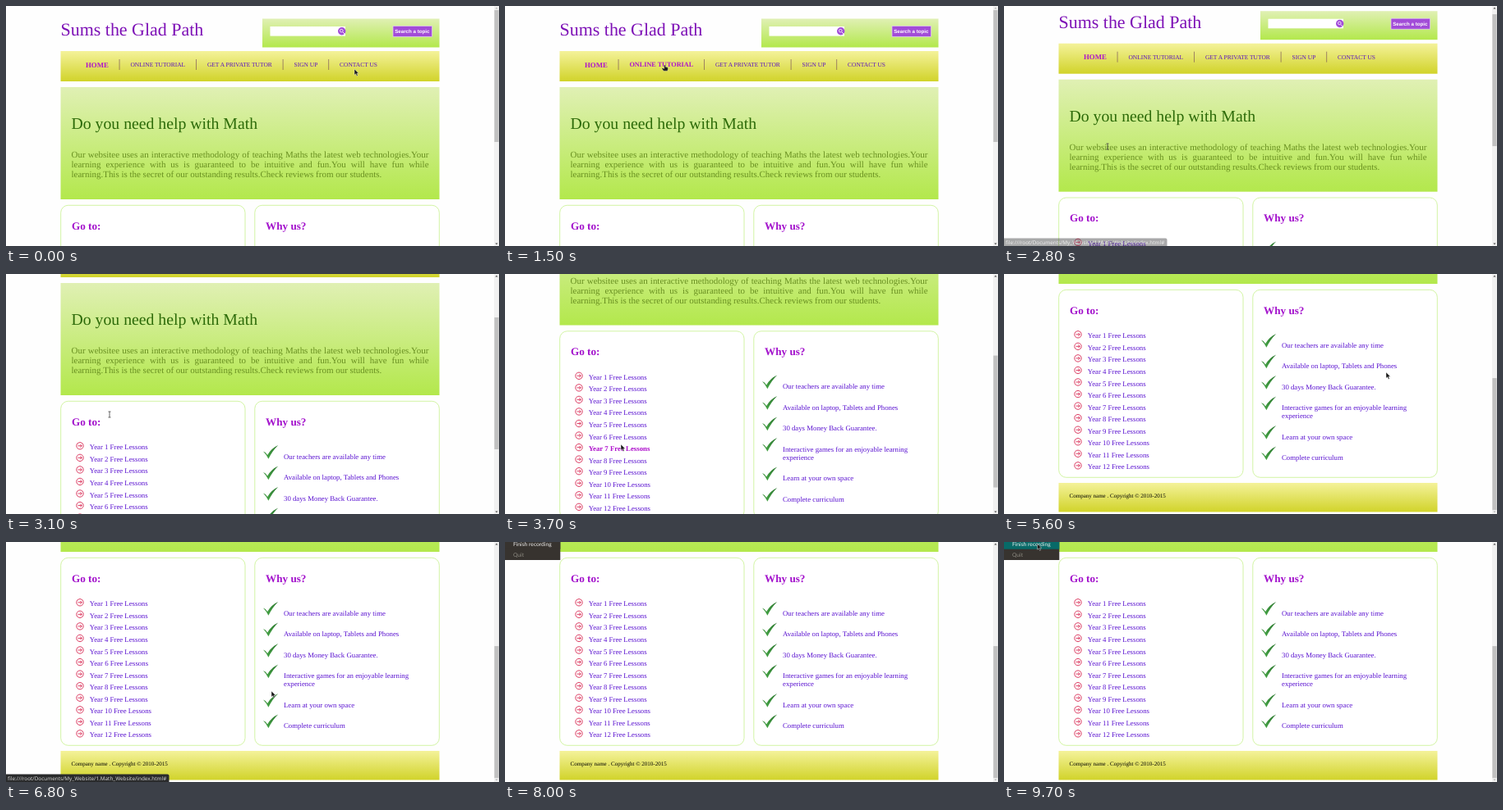
Animation, 600 px wide and 293 px high, one loop 9.9 s. Source, as an HTML page:

```html
<!DOCTYPE html>
<html lang="en">
<head>
<meta charset="utf-8">
<title>Maths lessons site</title>
<style>
  html, body { margin: 0; width: 100%; height: 100%; overflow: hidden; background: #fefefe; }
  svg { display: block; width: 100vw; height: 100vh; text-rendering: geometricPrecision;
        font-family: "Liberation Serif", "Times New Roman", serif; }
  p { margin: 0; font-size: 10.98px; line-height: 12.2px; text-align: justify; color: #688f20; }
  .link { fill: #5a12d0; font-size: 8.78px; }
  .heading { fill: #a312cc; font-size: 13.18px; font-weight: bold; }
  .panel { fill: #fff; stroke: #cdf39a; stroke-width: .9; }
  .bullet { fill: none; stroke: #dc3c62; stroke-width: 1; }
</style>
</head>
<body>
<svg viewBox="0 0 600 293">
  <defs>
    <linearGradient id="lime" x2="0" y2="1"><stop stop-color="#e0f0b4"/><stop offset="1" stop-color="#b3e84c"/></linearGradient>
    <linearGradient id="gold" x2="0" y2="1"><stop stop-color="#f4f29a"/><stop offset="1" stop-color="#d1d32a"/></linearGradient>
    <linearGradient id="leaf" x2="0" y2="1"><stop stop-color="#2f7a32"/><stop offset="1" stop-color="#45a545"/></linearGradient>
  </defs>

  <g id="page">
    <text x="66.5" y="36" font-size="21.96" fill="#7d10b6">Sums the Glad Path</text>
    <rect x="312" y="15.5" width="215.5" height="35" fill="url(#lime)"/>
    <rect x="321.5" y="25" width="91.5" height="11.6" fill="#fff"/>
    <circle cx="408.7" cy="30.8" r="4.7" fill="#a24cd8"/>
    <path d="M410 32l1.8 1.8" stroke="#fff"/>
    <circle cx="408.3" cy="30.2" r="1.8" fill="none" stroke="#fff" stroke-width=".8"/>
    <rect x="471" y="24.5" width="47.5" height="13" fill="#a24cd8" stroke="#e6cdf5" stroke-width=".7"/>
    <text x="473.2" y="33.1" font-size="6.2" font-weight="bold" fill="#fff" font-family="Liberation Sans, Arial, sans-serif">Search a topic</text>

    <rect x="66.5" y="55" width="461" height="37" fill="url(#gold)"/>
    <g id="nav"></g>

    <rect x="66.5" y="99" width="461" height="137" fill="url(#lime)"/>
    <text x="79.5" y="150" font-size="19.76" fill="#2c6a08">Do you need help with Math</text>
    <foreignObject x="79.5" y="175.9" width="435" height="40">
      <p>Our websitee uses an interactive methodology of teaching Maths the latest web technologies.Your learning experience with us is guaranteed to be intuitive and fun.You will have fun while learning.This is the secret of our outstanding results.Check reviews from our students.</p>
    </foreignObject>

    <rect class="panel" x="66.7" y="243.3" width="224.3" height="229" rx="9"/>
    <rect class="panel" x="302.8" y="243.3" width="224.5" height="229" rx="9"/>
    <text class="heading" x="80" y="272.5">Go to:</text>
    <text class="heading" x="316" y="272.5">Why us?</text>
    <g id="lessons"></g>
    <g id="reasons"></g>

    <rect x="66.5" y="479" width="461" height="35.5" fill="url(#gold)"/>
    <text x="79.5" y="496.8" font-size="7.03">Company name . Copyright © 2010-2015</text>
  </g>

  <rect x="594" width="6" height="293" fill="#f1f1f1"/>
  <rect id="thumb" x="594.4" width="5.2" height="161" fill="#c1c1c1"/>
  <path id="up" d="M595.4 3.6h3.2l-1.6-2z"/>
  <path id="down" d="M595.4 289.4h3.2l-1.6 2z"/>

  <g id="status" font-family="Noto Sans, Open Sans, sans-serif">
    <path d="M0 283.5h196.5q2 0 2 2v7.5h-198.5z" fill="#2a2b2c"/>
    <text x="2" y="290.6" font-size="6.36" fill="#d4d4d4">file:///root/Documents/My_Website/1.Math_Website/index.html#</text>
  </g>

  <g id="menu" font-family="Lato, sans-serif" font-size="6.7">
    <rect width="67.3" height="22" fill="#37332f"/>
    <rect id="menuRow" width="67.3" height="8.7"/>
    <text x="10" y="4.5" fill="#eee">Finish recording</text>
    <text x="10" y="17.8" fill="#8d8a82">Quit</text>
  </g>

  <g id="cursor">
    <path id="arrow" d="M0 0v7.2l1.7-1.5 1.2 2.7 1.3-.6-1.2-2.6h2.3z" fill="#1b1b1b" stroke="#fff" stroke-width=".4"/>
    <path id="hand" d="M-.8 .6q.8-1.1 1.6 0v1.7l3 .6v2.5l-.7 1.8h-4.6l-2-2.6.6-.9 2.1 .8z" fill="#1b1b1b" stroke="#fff" stroke-width=".3"/>
    <path id="beam" d="M-1.5 0h3M0 0v7M-1.5 7h3" stroke="#444" stroke-width=".8"/>
  </g>
</svg>

<script>
const LOOP = 9900, STEP = 100, MAX_SCROLL = 224;
const $ = id => document.getElementById(id);
const clamp = v => Math.max(0, Math.min(1, v));
const smooth = v => v * v * (3 - 2 * v);
const show = (id, on) => $(id).setAttribute("display", on ? "inline" : "none");

function add(parent, tag, attrs, text = "") {
  const el = document.createElementNS("http://www.w3.org/2000/svg", tag);
  for (const key in attrs) el.setAttribute(key, attrs[key]);
  el.textContent = text;
  return parent.appendChild(el);
}

// Linear interpolation over [time, ...values] keys; non-numbers are held.
function sample(keys, t) {
  const i = keys.findLastIndex(k => k[0] <= t);
  const a = keys[i], b = keys[i + 1] || a;
  const p = b === a ? 0 : (t - a[0]) / (b[0] - a[0]);
  return a.slice(1).map((v, n) => typeof v === "number" ? v + (b[n + 1] - v) * p : v);
}

const scrollKeys = [[0, 0], [2600, 0], [2800, 9.3], [3100, 88], [3200, 88], [3700, 173.5], [4100, MAX_SCROLL]];

const cursorKeys = [
  [0, 424, 77, "arrow"], [400, 424, 77, "arrow"], [700, 385, 74, "hand"],
  [1000, 310, 73, "hand"], [1300, 238, 74, "arrow"], [1500, 194.5, 72, "hand"],
  [1900, 165, 71, "hand"], [2300, 106, 72, "hand"], [2500, 126, 168, "beam"],
  [3300, 126, 168, "beam"], [3500, 138, 205, "arrow"], [3700, 141, 208, "arrow"],
  [4000, 145, 163, "hand"], [4300, 145, 160, "hand"], [4500, 145, 148, "hand"],
  [4900, 150, 106, "hand"], [5000, 200, 115, "arrow"], [5200, 368, 150, "arrow"],
  [5300, 390, 150, "arrow"], [5700, 490, 110, "arrow"], [6000, 200, 140, "arrow"],
  [6100, 165, 145, "hand"], [6300, 172, 147, "hand"], [6400, 190, 150, "arrow"],
  [6800, 323, 182, "arrow"], [7000, 425, 100, "arrow"], [7100, 424, 26, "arrow"],
  [7200, 424, 26, "none"], [8500, 164.5, 2, "arrow"], [8600, 164.5, 2, "none"],
  [9400, 58, 4, "arrow"], [9700, 40.5, 2, "arrow"]
];

// [item, from, to]
const navHovers = [[3, 700, 900], [2, 900, 1300], [1, 1400, 2100]];
const lessonHovers = [[6, 3650, 4400], [5, 4500, 4650], [4, 4650, 4800], [3, 4800, 4900], [2, 4900, 5000], [5, 6100, 6400]];
const statusTimes = [[1600, 2880], [4100, 5200], [5950, 7150]];

const nav = ["HOME", "ONLINE TUTORIAL", "GET A PRIVATE TUTOR", "SIGN UP", "CONTACT US"].map((label, i) => ({
  text: add($("nav"), "text", { y: i ? 74.2 : 74.8 }, label),
  line: i < 4 && add($("nav"), "path", { stroke: "#6f4258", "stroke-width": .6 })
}));

const lessons = Array.from({ length: 12 }, (_, i) => {
  const row = add($("lessons"), "g", {});
  add(row, "circle", { class: "bullet", cx: 90, cy: -4.5, r: 4.2 });
  add(row, "path", { class: "bullet", d: "M87.6-4.5h4.6M90.4-6.4l1.9 1.9-1.9 1.9" });
  return { row, text: add(row, "text", { class: "link", x: 101.7 }, `Year ${i + 1} Free Lessons`) };
});

let reasonY = 313.7;
for (const lines of [
  ["Our teachers are available any time"], ["Available on laptop, Tablets and Phones"],
  ["30 days Money Back Guarantee."], ["Interactive games for an enjoyable learning", "experience"],
  ["Learn at your own space"], ["Complete curriculum"]
]) {
  add($("reasons"), "path", {
    d: "M313 80q3 .8 5.2 4.4Q323 76 331.2 72.4 324 79.5 319.4 89.3 317 84 313 80z",
    fill: "url(#leaf)", transform: `translate(0 ${reasonY - 89.2})`
  });
  lines.forEach((line, i) => add($("reasons"), "text", { class: "link", x: 338, y: reasonY + i * 10 }, line));
  reasonY += 25.5 + (lines.length - 1) * 10;
}

const hovered = (list, item, t) => list.some(([n, from, to]) => n === item && t >= from && t < to);

function growth(item, t) {
  return Math.max(0, ...lessonHovers.filter(h => h[0] === item).map(([, from, to]) =>
    t < to ? smooth(clamp((t - from) / 500))
           : smooth(clamp((to - from) / 500)) * (1 - smooth(clamp((t - to) / 500)))));
}

function style(text, size, active, color) {
  text.style.fontSize = size + "px";
  text.style.fontWeight = active ? "bold" : "normal";
  text.style.fill = active ? "#ae10cc" : color;
}

function drawNav(t) {
  let x = 97;
  nav.forEach(({ text, line }, i) => {
    const active = i === 0 || hovered(navHovers, i, t);
    style(text, i === 0 ? 8.78 : active ? 8.2 : 7.47, active, "#5a12c0");
    text.setAttribute("x", x);
    x += text.getComputedTextLength() + 13.3;
    if (line) line.setAttribute("d", `M${x} 65v13`);
    x += 13.4;
  });
}

function drawLessons(t) {
  let y = 302.3;
  lessons.forEach(({ row, text }, i) => {
    const size = 8.78 + .88 * growth(i, t);
    y += (size - 8.78) * .6;
    style(text, size, hovered(lessonHovers, i, t), "#5a12d0");
    row.setAttribute("transform", `translate(0 ${y})`);
    y += 14.55;
  });
}

function draw(t) {
  const [scroll] = sample(scrollKeys, t);
  $("page").setAttribute("transform", `translate(0 ${-scroll})`);
  $("thumb").setAttribute("y", 5 + scroll * .545);
  $("up").setAttribute("fill", scroll > 0 ? "#505050" : "#b5b5b5");
  $("down").setAttribute("fill", scroll < MAX_SCROLL ? "#505050" : "#b5b5b5");
  drawNav(t);
  drawLessons(t);

  $("status").setAttribute("opacity", Math.max(...statusTimes.map(([a, b]) =>
    clamp(Math.min((t - a) / 200, (b - t) / 200)))));
  show("menu", t >= 8000);
  $("menuRow").setAttribute("fill", t >= 9400 ? "#086a68" : "#37332f");

  const [x, y, kind] = sample(cursorKeys, t);
  $("cursor").setAttribute("transform", `translate(${x} ${y})`);
  for (const id of ["arrow", "hand", "beam"]) show(id, id === kind);
}

function tick() {
  draw(Math.floor(performance.now() % LOOP / STEP) * STEP);
  requestAnimationFrame(tick);
}
tick();
</script>
</body>
</html>
```
